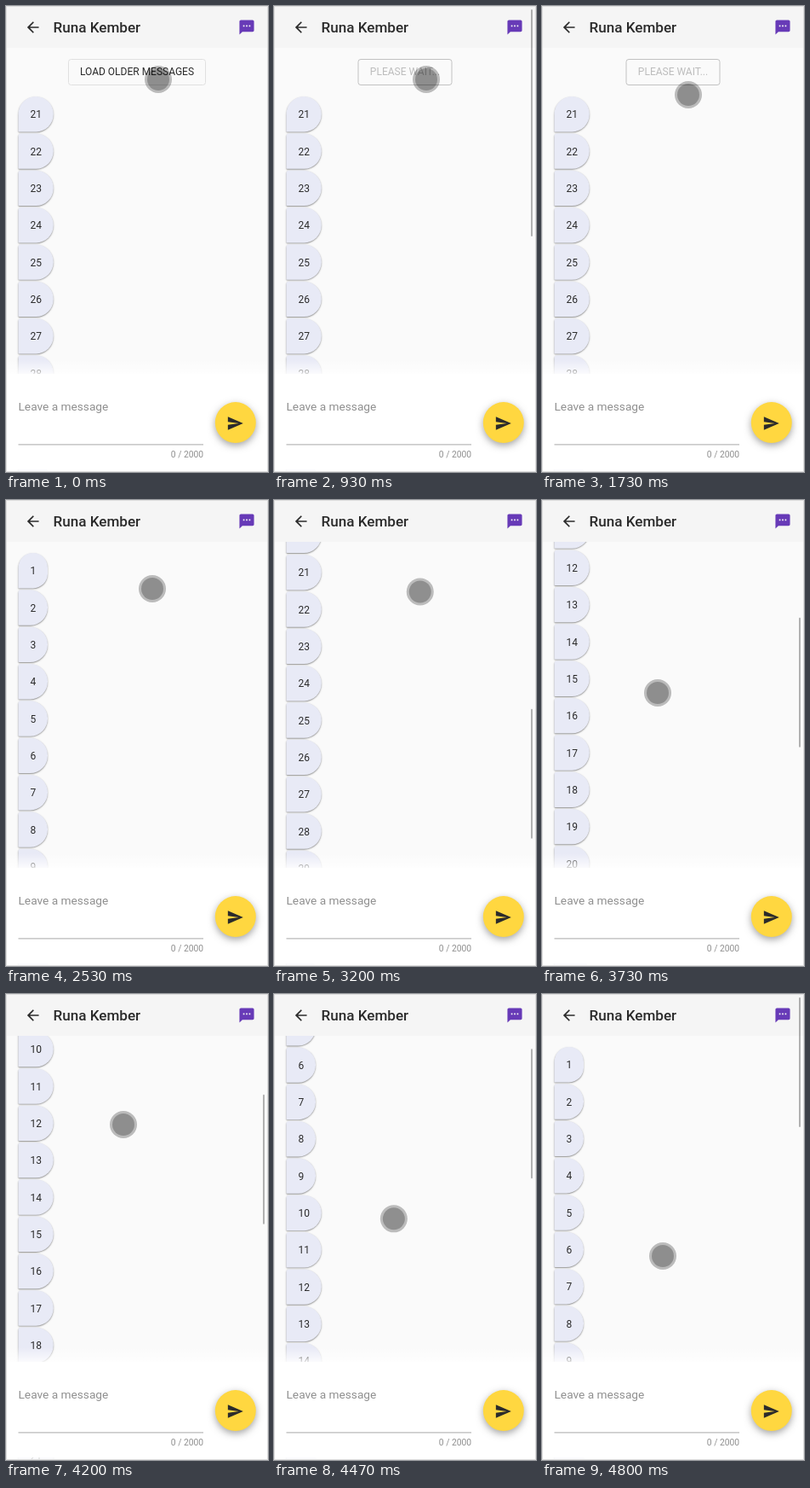
An HTML page with a canvas that plays this animation: 308 px wide and 546 px high, repeating every 4.99 s.

```html
<!DOCTYPE html>
<html lang="en">
<head>
<meta charset="utf-8">
<title>Chat: load older messages</title>
<style>
html, body { margin: 0; width: 100%; height: 100%; overflow: hidden; background: #fafafa; }
canvas { display: block; width: 308px; height: 546px; }
</style>
</head>
<body>
<canvas id="stage"></canvas>
<script>
const W = 308, H = 546, LOOP = 4990, STEP = 200 / 3;
const FONT = 'Roboto, sans-serif';
const INK = '#2b2b2b', MUTED = '#8f8f8f';
const PITCH = 43.33, LAST = 40;
const HEAD = 49, FOOT = 431, UNIT = 0.856;
const PRESSED = 870, WAITING = 930, LOADED = 2530, ADJUSTED = 2600, DRAGGED = 3200;
const SCROLL_END = 866.6, SCROLL_MID = 408;

const canvas = document.getElementById('stage');
const ctx = canvas.getContext('2d');
const dpr = window.devicePixelRatio || 1;
canvas.width = W * dpr;
canvas.height = H * dpr;

const icons = {
  back: new Path2D('M20 11H7.83l5.59-5.59L12 4l-8 8 8 8 1.41-1.41L7.83 13H20z'),
  chat: new Path2D('M20 2H4c-1.1 0-2 .9-2 2v18l4-4h14c1.1 0 2-.9 2-2V4c0-1.1-.9-2-2-2zM9 11H7V9h2zm4 0h-2V9h2zm4 0h-2V9h2z'),
  send: new Path2D('M2 21L23 12 2 3v7l15 2-15 2z')
};

// Eased moves of the touch point
const moves = [
  { from: 1200, to: 1730, x: 172, y: 104 },
  { from: 3170, to: 3550, x: 158, y: 300 },
  { from: 3550, to: 3730, x: 136, y: 226 },
  { from: 3730, to: 4000, x: 138, y: 153 },
  { from: 4230, to: 4600, x: 142, y: 307 }
];

const clamp = v => Math.min(1, Math.max(0, v));

function ease(t, from, to) {
  const u = clamp((t - from) / (to - from));
  return u * u * (3 - 2 * u);
}

function touchAt(t) {
  let x = 179, y = 86;
  for (const m of moves) {
    const k = ease(t, m.from, m.to);
    x += (m.x - x) * k;
    y += (m.y - y) * k;
  }
  return [x, y];
}

function scrollAt(t) {
  if (t < ADJUSTED) return 0;
  return SCROLL_END
    - (SCROLL_END - SCROLL_MID) * ease(t, 3171, 3917)
    - SCROLL_MID * ease(t, 4230, 4730);
}

function barAlpha(t) {
  if (t >= DRAGGED) return 1;
  return t < PRESSED ? 0 : clamp((1600 - t) / 330);
}

// The picture advances at 15 steps a second, on whole hundredths.
const tick = n => Math.round(n * STEP / 10) * 10;

function snap(t) {
  const n = Math.round(t / STEP);
  return tick(n) > t ? tick(n - 1) : tick(n);
}

function text(str, x, y, size, color, align = 'left', weight = 400) {
  ctx.font = `${weight} ${size}px ${FONT}`;
  ctx.textAlign = align;
  ctx.fillStyle = color;
  ctx.fillText(str, x, y);
}

function rect(x, y, w, h, color) {
  ctx.fillStyle = color;
  ctx.fillRect(x, y, w, h);
}

function rounded(x, y, w, h, r) {
  ctx.beginPath();
  ctx.roundRect(x, y, w, h, r);
}

function disc(x, y, r, color) {
  ctx.beginPath();
  ctx.arc(x, y, r, 0, Math.PI * 2);
  ctx.fillStyle = color;
  ctx.fill();
}

function icon(path, cx, cy, color) {
  ctx.save();
  ctx.translate(cx, cy);
  ctx.scale(UNIT, UNIT);
  ctx.translate(-12, -12);
  ctx.fillStyle = color;
  ctx.fill(path, 'evenodd');
  ctx.restore();
}

function shadow(color, blur, dy) {
  ctx.shadowColor = color;
  ctx.shadowBlur = blur * dpr;
  ctx.shadowOffsetY = dy * dpr;
}

function bubble(n, y, isFirst) {
  const w = n < 10 ? 34.5 : 41.3;
  ctx.save();
  shadow('rgba(0,0,0,.42)', 1.6, 0.9);
  rounded(14.5, y, w, 41.4, [isFirst ? 20.5 : 3, 20.5, 20.5, 1]);
  ctx.fillStyle = '#e8eaf6';
  ctx.fill();
  ctx.restore();
  text(n, 14.5 + w / 2, y + 25.3, 12, INK, 'center');
}

function messages(first, top) {
  for (let n = first; n <= LAST; n++) {
    const y = top + (n - first) * PITCH;
    if (y > 0 && y < H) bubble(n, y, n === first);
  }
}

function button(t) {
  const waiting = t >= WAITING;
  const w = waiting ? 110 : 161;
  rounded(154 - w / 2, 62.5, w, 30, 3);
  if (t >= PRESSED && !waiting) {
    ctx.fillStyle = 'rgba(0,0,0,.06)';
    ctx.fill();
  }
  ctx.strokeStyle = waiting ? '#c2c2c2' : '#e0e0e0';
  ctx.lineWidth = 1;
  ctx.stroke();
  text(waiting ? 'PLEASE WAIT...' : 'LOAD OLDER MESSAGES', 154, 81.4, 12,
    waiting ? '#bdbdbd' : INK, 'center');
}

function header() {
  rect(0, 0, W, HEAD, '#f5f5f5');
  icon(icons.back, 31.7, 25, INK);
  text('Runa Kember', 55.5, 31, 17.1, INK, 'left', 500);
  icon(icons.chat, 283, 25, '#673ab7');
}

function footer() {
  const fade = ctx.createLinearGradient(0, 414, 0, 434);
  fade.addColorStop(0, 'rgba(255,255,255,0)');
  fade.addColorStop(1, 'rgba(255,255,255,.95)');
  rect(0, 414, W, FOOT - 414, fade);
  rect(0, FOOT, W, 543 - FOOT, '#fff');
  rect(0, 543, W, 3, 'rgba(255,255,255,.82)');
  text('Leave a message', 14.5, 474, 13.7, MUTED);
  rect(14.5, 513.4, 217.5, 1, '#a8a8a8');
  text('0 / 2000', 232, 528.5, 10.27, MUTED, 'right');
  ctx.save();
  shadow('rgba(0,0,0,.36)', 9, 3);
  disc(269.8, 488.1, 24, '#ffd740');
  ctx.restore();
  icon(icons.send, 269.4, 489, INK);
}

function scrollbar(t, top) {
  const length = t < LOADED ? 266 : 152;
  rounded(302, 4 + top * 0.2785, 2, length, 1);
  ctx.fillStyle = `rgba(0,0,0,${0.29 * barAlpha(t)})`;
  ctx.fill();
}

function pointer(t) {
  const [x, y] = touchAt(t);
  disc(x, y, 16, 'rgba(0,0,0,.25)');
  disc(x, y, 13, 'rgba(0,0,0,.24)');
}

function draw(t) {
  const top = scrollAt(t);
  ctx.setTransform(dpr, 0, 0, dpr, 0, 0);
  rect(0, 0, W, H, '#fafafa');
  if (t >= LOADED) {
    messages(1, 62 - top);
  } else {
    button(t);
    messages(21, 106);
  }
  header();
  footer();
  ctx.strokeStyle = '#dedede';
  ctx.lineWidth = 1;
  ctx.strokeRect(0.5, 0.5, W - 1, H - 1);
  scrollbar(t, top);
  pointer(t);
}

const start = performance.now();

function frame() {
  draw(snap((performance.now() - start) % LOOP));
  requestAnimationFrame(frame);
}
frame();
</script>
</body>
</html>
```
